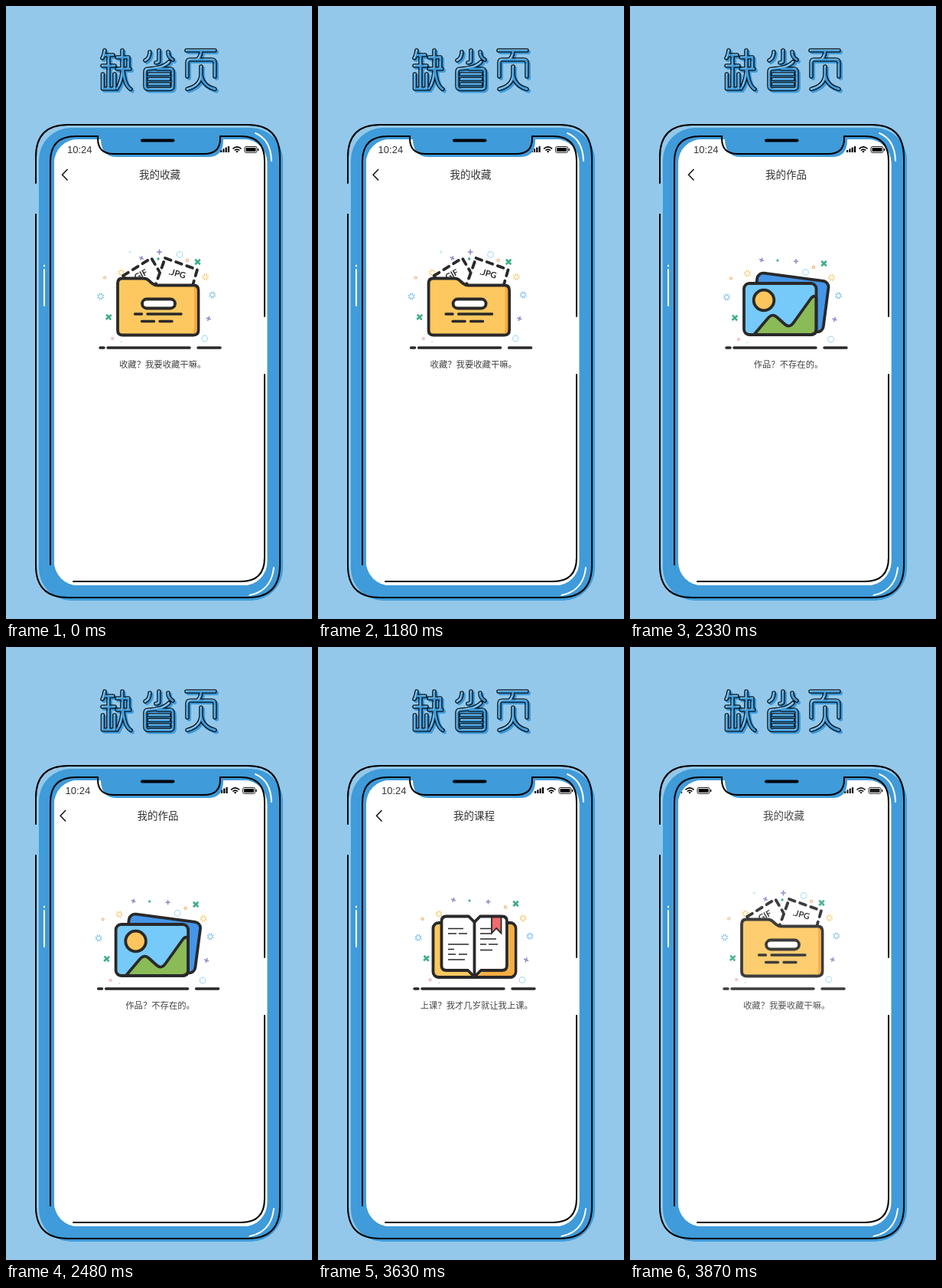
An HTML page that plays this animation: 400 px wide and 800 px high, repeating every 3900 ms.

```html
<!DOCTYPE html>
<html lang="zh-CN">
<head>
<meta charset="utf-8">
<style>
  html, body { margin: 0; width: 100%; height: 100%; overflow: hidden; background: #93c8ea; }
  svg { display: block; width: 400px; height: 800px; }
  text { font-family: "Noto Sans CJK SC", "Noto Sans CJK", sans-serif; fill: #333; }
  .clock { font: 13px "Liberation Sans", Arial, sans-serif; }
  .tag { font: bold 11px Lato, "Open Sans", sans-serif; fill: #2a2a2a; }
  .line { fill: none; stroke: #000; stroke-width: 2; stroke-linecap: round; }
  .shine { fill: none; stroke: #fff; stroke-width: 2; stroke-linecap: round; }
  .ink { stroke: #292929; stroke-width: 3.8; stroke-linecap: round; stroke-linejoin: round; }
  .word { fill: none; stroke-linecap: round; stroke-linejoin: round; }
</style>
</head>
<body>
<svg id="stage" viewBox="0 0 400 800" xmlns="http://www.w3.org/2000/svg"></svg>
<script>
const BLUE = '#3f9bd9', SKY = '#93c8ea';
const GREEN = '#3eae83', PURPLE = '#9487c4', YELLOW = '#f5c765', ORANGE = '#f0b27c', AQUA = '#6cb9e6', PALE = '#a9dbf3';

const path = (d, attrs = '') => `<path d="${d}" ${attrs}/>`;
const strokes = (list, attrs) => path(list.map(([x1, x2, y]) => `M${x1} ${y}H${x2}`).join(''), attrs);
const dot = (x, y, r, color) => `<circle cx="${x}" cy="${y}" r="${r}" fill="${color}"/>`;
const ring = (x, y, r, color) => `<circle cx="${x}" cy="${y}" r="${r}" fill="none" stroke="${color}" stroke-width="1.2"/>`;
const plus = (x, y, r, angle, color, w) =>
  path(`M${-r} 0H${r}M0 ${-r}V${r}`, `transform="translate(${x} ${y}) rotate(${angle})" stroke="${color}" stroke-width="${w}"`);

function burst(x, y, color) {
  let d = '';
  for (let i = 0; i < 8; i++) {
    const a = (i + 0.5) * Math.PI / 4, c = Math.cos(a), s = Math.sin(a);
    d += `M${x + 2 * c} ${y + 2 * s}L${x + 4.5 * c} ${y + 4.5 * s}`;
  }
  return path(d, `stroke="${color}" stroke-width="1.3"`);
}

// Confetti shared by all three pages.
const confetti = (dx, dy) => `<g transform="translate(${dx} ${dy})">` +
  burst(149.5, 349, YELLOW) + burst(259.5, 354.5, YELLOW) +
  burst(122.5, 380, AQUA) + burst(268.5, 378, AQUA) +
  ring(128, 355.5, 1.5, ORANGE) +
  plus(133, 407, 4.6, 50, GREEN, 2.6) + plus(263.5, 409, 3.2, 20, PURPLE, 1.6) +
  dot(138, 435, 2.3, '#f0c9d6') + ring(258.5, 435, 3.8, PALE) + dot(149.5, 439, 1.2, '#cfe9f6') + '</g>';

const ground = x => strokes([[x, x + 5, 446], [x + 10, x + 117, 446], [x + 128, x + 157, 446]], 'class="ink" style="stroke-width:3.5"');

function folder() {
  return confetti(1.2, -1) +
    dot(162, 321, 1.8, '#cfe9f6') + plus(177, 329, 3, 25, PURPLE, 1.6) + plus(200.5, 321, 3.4, 0, PURPLE, 1.6) +
    dot(199, 330, 1.7, GREEN) + ring(227, 324.5, 3.8, PALE) + ring(237, 332, 1.6, ORANGE) + plus(250.5, 334, 4.6, 45, GREEN, 2.6) +
    path('M153 352L190 329L212 366L170 374Z', 'fill="#fff" class="ink" stroke-dasharray="8 7"') +
    '<text class="tag" text-anchor="middle" transform="translate(178 354) rotate(-28)">GIF</text>' +
    path('M208 329L250 344L242 372L194 368Z', 'fill="#fff" class="ink" stroke-dasharray="8 7"') +
    '<text class="tag" text-anchor="middle" transform="translate(223 353) rotate(15)">.JPG</text>' +
    path('M146 362Q146 355.5 152 355.5H180Q184 355.5 187 358.5L191 362Q194 364.5 198 364.5H245Q251.5 364.5 251.5 371V423Q251.5 429.5 245 429.5H152Q146 429.5 146 423Z', 'fill="#fdc860" class="ink"') +
    path('M244 366.5Q249.6 366.5 249.6 372V422Q249.6 427.5 244 427.5Q246 425 246 421V372Q246 368 244 366.5Z', 'fill="#f7a93f"') +
    '<rect x="178" y="382.5" width="43" height="12" rx="6" fill="#fff" class="ink"/>' +
    strokes([[168.5, 177.5, 402], [185, 229, 402], [177.5, 193.5, 411.5], [201, 217, 411.5]], 'class="ink" style="stroke-width:3.4"') +
    ground(123);
}

function pictures() {
  return confetti(0, 0) +
    plus(168, 331.5, 3, 20, PURPLE, 1.6) + dot(189, 332, 1.6, GREEN) + plus(213, 333.3, 3, 0, PURPLE, 1.6) +
    ring(225.5, 347.5, 3.8, PALE) + ring(236, 341, 1.6, ORANGE) + plus(249.5, 336, 4.6, 45, GREEN, 2.6) +
    '<rect x="-47" y="-33.5" width="94" height="67" rx="8" transform="translate(205.5 387) rotate(7.5)" fill="#4596e8" class="ink"/>' +
    '<rect x="145" y="362" width="94.5" height="67" rx="7" fill="#76caf9"/>' +
    path('M158 429L175 409Q181.5 400 188 406L198 415Q204.5 421 210 413L233 381Q237 376.5 239.5 381V422Q239.5 429 232.5 429Z', 'fill="#8bbb57" class="ink"') +
    '<circle cx="171" cy="384" r="13.3" fill="#fdc55d" class="ink"/>' +
    '<rect x="145" y="362" width="94.5" height="67" rx="7" fill="none" class="ink"/>' +
    ground(122);
}

function book() {
  return confetti(4.6, -0.6) +
    plus(173, 330, 3, 20, PURPLE, 1.6) + dot(194, 331, 1.6, GREEN) + plus(218.5, 332.5, 3, 0, PURPLE, 1.6) +
    ring(241, 339.5, 1.6, ORANGE) + plus(254.5, 335, 4.6, 45, GREEN, 2.6) +
    '<rect x="146.5" y="360" width="108" height="71" rx="7" fill="#fdc860" class="ink"/>' +
    path('M246 362Q252.6 362 252.6 368V423Q252.6 429 246 429H206L212 424H238Q246 424 246 416Z', 'fill="#f7ad43"') +
    path('M157.5 358Q157.5 351.5 164 351.5H193L200.5 359L208 351.5H236.5Q243 351.5 243 358V416Q243 422 236.5 422H209L200.5 430.5L192 422H164Q157.5 422 157.5 416Z', 'fill="#fff" class="ink"') +
    path('M200.5 359V430', 'class="ink"') +
    strokes([[166, 186, 367.5], [166, 177, 374], [180, 191, 374], [166, 193, 388], [166, 174, 394.5], [166, 176, 401], [180, 191, 401], [166, 188, 408],
      [208, 222, 367.5], [208, 222, 374], [208, 229, 381], [208, 216, 388], [219, 231, 388], [208, 224, 395.5]], 'stroke="#292929" stroke-width="1.6"') +
    path('M223 352.5H235.5V373.5L229.2 367L223 373.5Z', 'fill="#ef6c6c" stroke="#292929" stroke-width="1.8"') +
    ground(122);
}

function statusBar() {
  let bars = '';
  for (let i = 0; i < 4; i++) bars += `<rect x="${280 + i * 3.3}" y="${188 - i * 1.7}" width="2.2" height="${3 + i * 1.7}" rx=".6"/>`;
  return '<text class="clock" x="80" y="191.5">10:24</text>' + bars +
    path('M296.5 186.3Q302 181.5 307.5 186.3M298.7 188.5Q302 185.6 305.3 188.5', 'fill="none" stroke="#000" stroke-width="1.6"') +
    path('M300.2 189.7Q302 188.4 303.8 189.7L302 191.5Z') +
    '<rect x="312" y="183.5" width="16" height="7.8" rx="2" fill="none" stroke="#000" stroke-width=".9"/>' +
    '<rect x="313.5" y="185" width="13" height="4.8" rx=".8"/><rect x="329" y="186" width="1.3" height="3" rx=".6"/>';
}

const pages = [
  { title: '我的收藏', note: '收藏？我要收藏干嘛。', x: 148, left: 0, art: folder },
  { title: '我的作品', note: '作品？不存在的。', x: 157.7, left: -1, art: pictures },
  { title: '我的课程', note: '上课？我才几岁就让我上课。', x: 129.7, left: -1, art: book }
];

const pageSvg = ({ title, note, x, left, art }) => `<g class="page">
  <rect x="${62 + left}" y="172" width="279" height="586" fill="#fff"/>
  <g transform="translate(${left} 0)">${statusBar()}
    ${path('M80.5 213L73.5 220.3L80.5 227.6', 'fill="none" stroke="#111" stroke-width="1.5"')}
    <text x="201" y="225.3" font-size="13.5" text-anchor="middle">${title}</text></g>
  <text x="${x}" y="472.3" font-size="11.33" font-weight="300" style="fill:#444">${note}</text>
  ${art()}</g>`;

const heading =
  'M129 58Q128 65 126 68M128 64H140M126 78H142M134 64V107M126.5 89V108H142V89' +
  'M152 58V82Q152 98 145 108M145 67H160V81M145 82H162M153 84Q155 104 163 108.5' +
  'M200 58V71Q200 74 196 74M188 60Q188 68 182 71M212 60Q212 67 218 70' +
  'M213 73Q206 81 186 82Q182 82 182 86V104Q182 108.5 186 108.5H214Q218 108.5 218 104V86Q218 82 214 82H198M187 89H213M187 95.5H213M187 102H213' +
  'M236 58H273M255 58Q255 66 250 70M237 92V74Q237 70 241 70H269Q273 70 273 74V92M255 79V90Q254 104 237 108.5M255 90Q257 104 273 108.5';

document.getElementById('stage').innerHTML = `
  <defs>
    <clipPath id="screen"><rect x="63" y="174" width="278.5" height="582" rx="31"/></clipPath>
    <mask id="hollow" maskUnits="userSpaceOnUse" x="110" y="40" width="180" height="90">
      ${path(heading, 'class="word" stroke="#fff" stroke-width="5.6"')}
      ${path(heading, 'class="word" stroke="#000" stroke-width="2.9"')}
    </mask>
  </defs>
  <rect width="400" height="800" fill="${SKY}"/>
  ${path(heading, `class="word" stroke="${BLUE}" stroke-width="5.4" transform="translate(2.3 2.3)"`)}
  <rect x="110" y="40" width="180" height="90" fill="#06131d" mask="url(#hollow)"/>
  <rect x="43" y="159" width="319" height="617" rx="42" fill="${BLUE}"/>
  <g clip-path="url(#screen)"><rect x="60" y="170" width="284" height="590" fill="#fff"/><g id="pages">${pages.map(pageSvg).join('')}</g></g>
  ${path('M124 172V175Q125 197 145 197H264Q284 197 284 175V172Z', `fill="${BLUE}"`)}
  ${path('M39 231V197Q39 155 81 155H316Q358 155 358 197V730Q358 772 316 772H81Q39 772 39 730V272', 'class="line"')}
  ${path('M58 729V203Q58 170 91 170H120V173Q120 193 141 193H259Q280 193 280 173V170H307Q338 170 338 202V405M338 481V720Q338 751 307 751H88', 'class="line"')}
  ${path('M178 175.5H218.5', 'class="line" style="stroke-width:4"')}
  ${path('M50 344V391M50 338.5V339.5M326 166Q346 174 347 202M350 733Q347 763 318.5 769', 'class="shine"')}`;

const layer = document.getElementById('pages');
const views = [...layer.children];
const HOLD = 1030, TURN = 1300, STEP = 30, WIDTH = 278;

// Winds up slightly to the right, then accelerates away to the left.
const backIn = p => 2.70158 * p ** 3 - 1.70158 * p ** 2;

let front = -1;
function draw() {
  const time = performance.now() % (TURN * 3);
  const now = Math.floor(time / TURN), next = (now + 1) % 3;
  const local = time - now * TURN;
  const moving = local >= HOLD;
  const step = Math.floor((local - HOLD) / STEP);
  if (front !== now) {
    layer.append(views[next], views[now]);
    front = now;
  }
  views.forEach((view, i) => {
    view.style.display = i === now || (moving && i === next) ? '' : 'none';
    view.setAttribute('opacity', i === next ? (step + 1) / 10 : 1);
    const shift = moving && i === now ? -WIDTH * backIn(0.1 + step * 0.1069) : 0;
    view.setAttribute('transform', `translate(${shift.toFixed(2)} 0)`);
  });
  requestAnimationFrame(draw);
}
draw();
</script>
</body>
</html>
```
